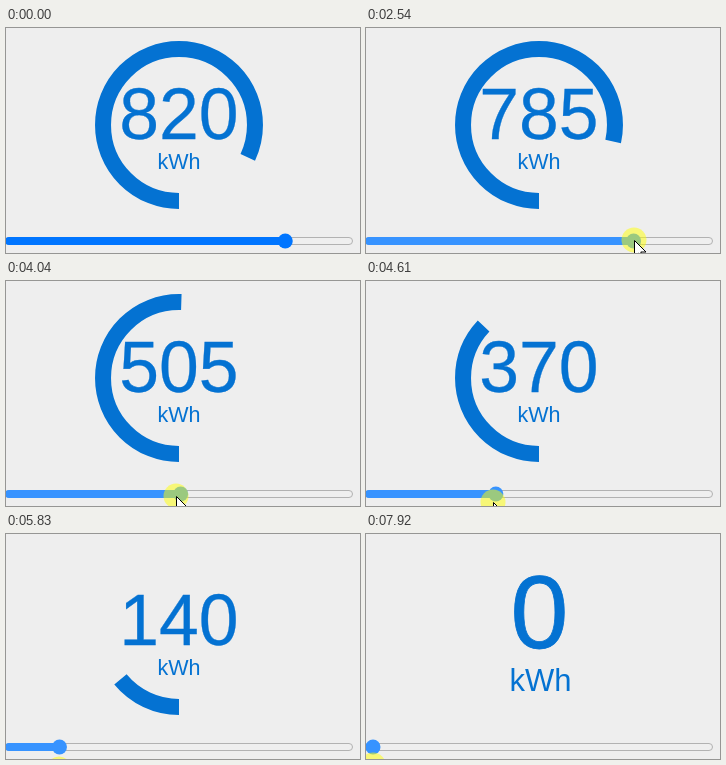
Write an HTML page that moves like this. It is 354 px wide and 225 px high and loops after 7990 ms.

```html
<!DOCTYPE html>
<html lang="en">
<head>
<meta charset="utf-8">
<title>Energy gauge</title>
<style>
  html, body { margin: 0; height: 100%; overflow: hidden; background: #eee; }
  svg { display: block; width: 354px; height: 225px; }
  text { font-family: "Liberation Sans", Arial, sans-serif; text-anchor: middle; fill: #0472d2; }
  #number { stroke: #0472d2; }
</style>
</head>
<body>
<svg viewBox="0 0 354 225">
  <path id="arc" d="M173 173a76 76 0 0 1 0-152a76 76 0 0 1 0 152" pathLength="1000"
        fill="none" stroke="#0472d2" stroke-width="16"/>
  <text id="number"></text>
  <text id="unit">kWh</text>
  <rect id="track" x="-.5" y="209.5" width="347" height="7" rx="3.5" fill="#efefef"/>
  <path id="fill"/>
  <circle id="thumb" cy="213" r="7.5"/>
  <g id="pointer">
    <circle id="halo" r="12.5" fill="#ff0" fill-opacity=".5"/>
    <path d="M.5 .5v16l3.7-3.5 2.6 6 2.6-1.1-2.6-5.9h5.2z" fill="#fff" stroke="#000"/>
  </g>
</svg>
<script>
const DURATION = 7990, ENTER = 540, HOVER = 930, PRESS = 2060, RELAX = 7520;
const $ = id => document.getElementById(id);
const set = (id, attrs) => {
  for (const name in attrs) $(id).setAttribute(name, attrs[name]);
};

// Smooth progress from 0 to 1 between two times
function ease(t, from, to) {
  const u = Math.min(1, Math.max(0, (t - from) / (to - from)));
  return u * u * (3 - 2 * u);
}

// Slider drag as [time, value]
const drag = [[PRESS, 820], [2540, 785], [4040, 505], [5220, 230], [6430, 55], [RELAX, 0]];

function energyAt(t) {
  if (t <= PRESS) return 820;
  const i = drag.findIndex(([time]) => time > t);
  if (i < 0) return 0;
  const [t0, a] = drag[i - 1], [t1, b] = drag[i];
  return Math.round((a + (b - a) * (t - t0) / (t1 - t0)) / 5) * 5;
}

function pointerAt(t, thumbX) {
  if (t < PRESS) return [
    258 + 19 * ease(t, ENTER, 1260),
    226 - 54 * ease(t, ENTER, 780) + 37 * ease(t, 780, 1080) + 3 * ease(t, 1730, 1800)
  ];
  const lag = 5 * ease(t, 2540, 4040) * (1 - ease(t, 4040, 5220));
  return [thumbX - lag, 212 + 26 * ease(t, 3400, 6430) - 7 * ease(t, 7780, 7920)];
}

function draw(t) {
  const value = energyAt(t);
  const thumbX = 7 + value * .332;
  const pressed = t >= PRESS, hovered = t >= HOVER;
  const color = pressed ? '#3793ff' : hovered ? '#005cc8' : '#0075ff';
  const large = value < 100;

  set('arc', { 'stroke-dasharray': `${value} 1000` });
  $('number').textContent = value;
  set('number', large
    ? { x: 173.5, y: 114, 'font-size': 104, 'stroke-width': .8 }
    : { x: 173, y: 111, 'font-size': 71.5, 'stroke-width': .3 });
  set('unit', large
    ? { x: 174.5, y: 157, 'font-size': 31 }
    : { x: 173, y: 141, 'font-size': 21.5 });

  set('track', { stroke: hovered && !pressed ? '#999' : '#b2b2b2' });
  set('fill', { d: `M${thumbX} 209H3a4 4 0 0 0 0 8H${thumbX}z`, fill: color });
  set('thumb', { cx: thumbX, fill: color });

  const [x, y] = pointerAt(t, thumbX).map(Math.round);
  set('pointer', {
    transform: `translate(${x} ${y})`,
    visibility: t < ENTER ? 'hidden' : 'visible'
  });
  set('halo', { opacity: pressed ? 1 : 0 });
}

const start = performance.now();
function tick() {
  draw((performance.now() - start) % DURATION);
  requestAnimationFrame(tick);
}
tick();
</script>
</body>
</html>
```
